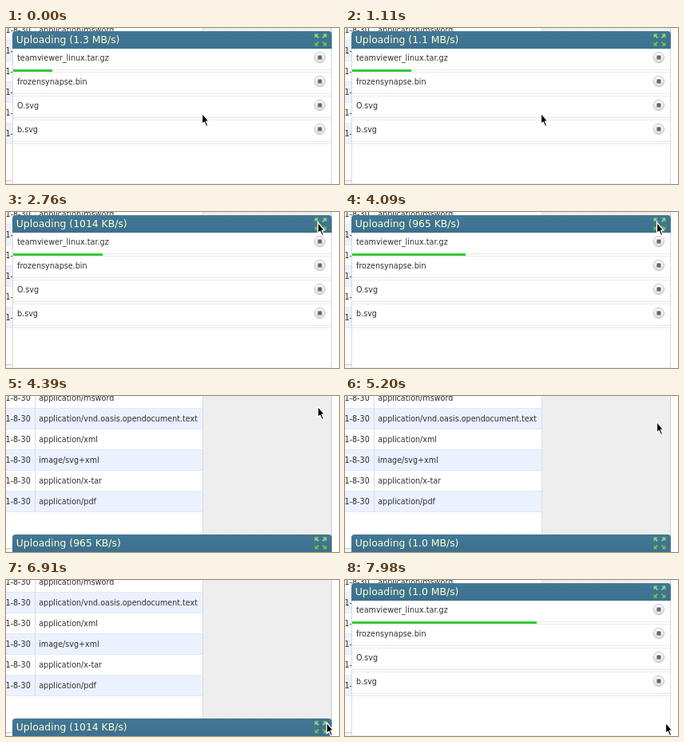
An HTML page for the animation above (8 s loop, 417 by 196 pixels).

```html
<!DOCTYPE html>
<html lang="en">
<head>
<meta charset="utf-8">
<title>Upload panel</title>
<style>
  html, body { margin: 0; width: 100%; height: 100%; overflow: hidden; background: #fff; }
  svg { display: block; width: 417px; height: 196px; }
  text { font: 9.6px "DejaVu Sans", Verdana, sans-serif; fill: #2e2e2e; }
  #speed { font-size: 12.4px; fill: #ffffd2; }

  #panel, #list, #bar, #cursor { animation: 8s infinite; }
  #panel { animation-name: dock; animation-timing-function: step-end; }
  #list { animation-name: hide; animation-timing-function: step-end; }
  #bar { animation-name: fill; animation-timing-function: steps(183); }
  #cursor { animation-name: point; animation-timing-function: linear; }

  @keyframes dock {
    0%, 88.25% { transform: none; }
    51.625% { transform: translateY(170px); }
  }
  @keyframes hide {
    0%, 88.25% { visibility: visible; }
    51.625% { visibility: hidden; }
  }
  @keyframes fill {
    from { width: 49px; }
    to { width: 232px; }
  }
  @keyframes point {
    0% { transform: translate(245px, 107px); }
    21.375% { transform: translate(245px, 107px); animation-timing-function: cubic-bezier(.2, .65, .35, 1); }
    31.375%, 62.875% { transform: translate(390px, 13px); animation-timing-function: cubic-bezier(.3, .05, .6, .9); }
    72.625% { transform: translate(389px, 137px); animation-timing-function: ease-out; }
    77.625%, 100% { transform: translate(401px, 179px); }
  }
</style>
</head>
<body>
<svg viewBox="0 0 417 196">
  <defs>
    <linearGradient id="blue" x2="0" y2="1">
      <stop stop-color="#417895"/><stop offset="1" stop-color="#3d708f"/>
    </linearGradient>
    <linearGradient id="knob" x2="0" y2="1">
      <stop stop-color="#fff"/><stop offset="1" stop-color="#dcdcdc"/>
    </linearGradient>
    <g id="stop">
      <circle r="6.6" fill="url(#knob)" stroke="#b4b4b4" stroke-width=".8"/>
      <path d="M-2.5-2.5h5v5h-5z" fill="#666"/>
    </g>
    <path id="arrow" d="M-7.5-7.5H-2.5L-4.2-5.8-2-3.2-3.2-2-5.8-4.2-7.5-2.5Z"/>
  </defs>

  <g id="table">
    <path d="M246 0H407V196H246Z" fill="#eee"/>
    <path d="M0 191.5H246M407.5 0V196" stroke="#cdcdcd"/>
    <path d="M0 192H246V196H0Z" fill="#f3f3f3"/>
  </g>

  <g id="panel">
    <g id="list">
      <path d="M8.5 20V196H407.5V20Z" fill="#fff" stroke="#d8d8d8"/>
      <rect id="bar" x="9" y="52" height="3" fill="#33cc33"/>
    </g>
    <path d="M8 26V8a4 4 0 0 1 4-4H404a4 4 0 0 1 4 4V26Z" fill="url(#blue)"/>
    <text id="speed" x="12.8" y="19"></text>
    <g transform="translate(394 15)">
      <g fill="#93d565">
        <use href="#arrow"/>
        <use href="#arrow" transform="rotate(90)"/>
      </g>
      <g fill="#72c23c">
        <use href="#arrow" transform="rotate(180)"/>
        <use href="#arrow" transform="rotate(270)"/>
      </g>
    </g>
  </g>

  <path id="cursor" d="M.5 0V14L3.3 11.2 5.6 16.6 7.8 15.6 5.6 10.2H9Z"
        fill="#000" stroke="#fff" stroke-width="1.3" stroke-linejoin="round"/>
</svg>
<script>
const $ = id => document.getElementById(id);

function add(parent, tag, attrs, text = '') {
  const el = document.createElementNS('http://www.w3.org/2000/svg', tag);
  for (const key in attrs) el.setAttribute(key, attrs[key]);
  el.textContent = text;
  parent.append(el);
}

const types = ['application/msword', 'application/vnd.oasis.opendocument.text', 'application/xml',
  'image/svg+xml', 'application/x-tar', 'application/pdf'];
types.forEach((type, i) => {
  const top = 26 * i - 10, y = top + 16;
  if (i % 2) add($('table'), 'path', { d: `M0 ${top}H246v26H0Z`, fill: '#ebf1fe' });
  add($('table'), 'path', { d: `M0 ${top + 25.5}H246`, stroke: '#e3e8f0' });
  add($('table'), 'text', { x: -.6, y }, '1-8-30');
  add($('table'), 'text', { x: 41.2, y }, type);
});
add($('table'), 'path', { d: 'M36.5 0V146M246.5 0V191', stroke: '#d9dde4' });

['teamviewer_linux.tar.gz', 'frozensynapse.bin', 'O.svg', 'b.svg'].forEach((name, i) => {
  const y = 30 * i;
  add($('list'), 'path', { d: `M9 ${y + 52.5}H407M9 ${y + 55.5}H407`, stroke: '#e8e8e8' });
  add($('list'), 'text', { x: 14, y: y + 41 }, name);
  add($('list'), 'use', { href: '#stop', x: 393, y: y + 37 });
});
$('list').append($('bar'));

// Transfer rate in KB/s from each moment (ms) on
const rates = { 0: 1330, 300: 1230, 950: 1126, 2590: 1014, 3500: 965,
  4390: 1050, 6530: 1014, 6910: 965, 7300: 1050 };
const format = kb => kb < 1024 ? `${kb} KB/s` : `${(kb / 1024).toFixed(1)} MB/s`;
const clock = $('panel').getAnimations()[0];

function draw() {
  const t = (clock.currentTime ?? 0) % 8000;
  const since = Object.keys(rates).findLast(time => time <= t);
  $('speed').textContent = `Uploading (${format(rates[since])})`;
  requestAnimationFrame(draw);
}
draw();
</script>
</body>
</html>
```
